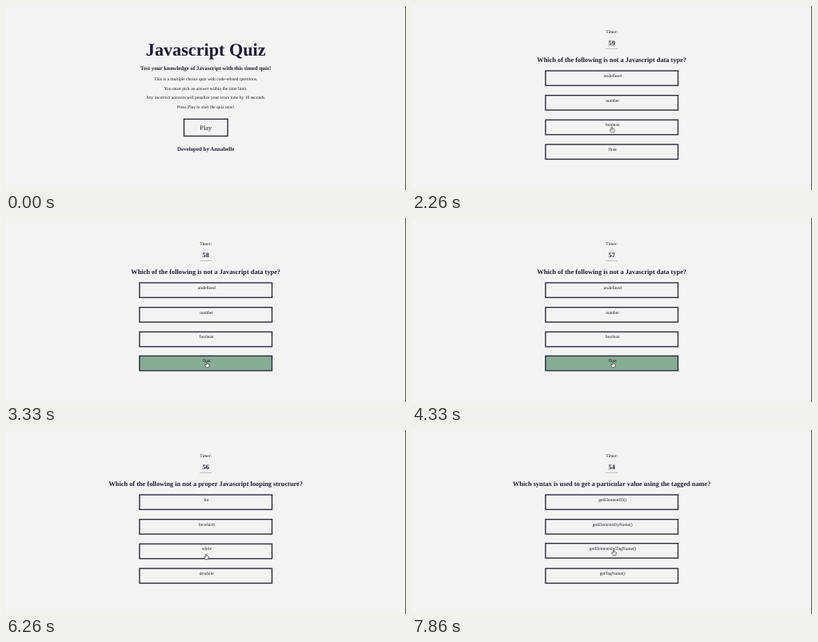
An HTML page for the animation above (8 s loop, 500 by 230 pixels).

```html
<!DOCTYPE html>
<html lang="en">
<head>
<meta charset="utf-8">
<title>Javascript Quiz</title>
<style>
  html, body { margin: 0; width: 100%; height: 100%; overflow: hidden; background: #f3f3f3; }
  svg { display: block; width: 500px; height: 230px; }
  text { font-family: "Liberation Serif", "Times New Roman", serif; font-size: 5.55px;
         text-anchor: middle; text-rendering: geometricPrecision; fill: #1b1a24; }
  .bold { font-weight: bold; fill: #1e1c31; }
  .btn rect { fill: transparent; stroke: #29263d; stroke-width: 1.35; }
  .right rect { fill: #88ab95; }
</style>
</head>
<body>
<svg viewBox="0 0 500 230">
  <g id="home"></g>
  <g id="quiz"></g>
  <g id="cursor">
    <path id="arrow" d="M0 0V5.6L1.3 4.5L2.2 6.5L3.1 6.1L2.2 4.1H3.9Z" fill="#222" stroke="#fff" stroke-width=".4"/>
    <path id="hand" d="M-.7 .5Q0 -.5 .6 .5V2.3L2.9 2.8Q3.5 3 3.4 3.9L2.7 6.7H-.6L-2.5 4.1Q-2.4 3.1 -1.5 3.5L-.7 4.1Z" fill="#fff" stroke="#333" stroke-width=".7"/>
  </g>
  <rect x="499" width="1" height="230" fill="#555"/>
</svg>
<script>
const LOOP = 8000, MID = 249.7, PITCH = 30.7, LIFT = 0.7;
const $ = id => document.getElementById(id);
const home = $("home"), quiz = $("quiz");

function add(parent, tag, attrs, content = "") {
  const el = document.createElementNS("http://www.w3.org/2000/svg", tag);
  for (const key in attrs) el.setAttribute(key, attrs[key]);
  el.textContent = content;
  return parent.appendChild(el);
}

function label(parent, y, content, size = 5.55, cls = "", x = MID) {
  return add(parent, "text", { x, y, class: cls, style: `font-size:${size}px` }, content);
}

function button(parent, x, y, width, height) {
  const g = add(parent, "g", { class: "btn" });
  add(g, "rect", { x, y, width, height });
  return g;
}

// Start page
label(home, 62, "Javascript Quiz", 22.2, "bold");
label(home, 80.4, "Test your knowledge of Javascript with this timed quiz!", 6.93, "bold");
["This is a multiple choice quiz with code-related questions.",
 "You must pick an answer within the time limit.",
 "Any incorrect answers will penalize your score time by 10 seconds.",
 "Press Play to start the quiz now!"
].forEach((line, i) => label(home, 92.8 + i * 11.83, line));
const play = button(home, 222.5, 141.4, 54.6, 21.2);
label(play, 154.9, "Play", 8.33);
label(home, 181, "Developed by Annabelle", 6.93, "bold");

// Quiz page
label(quiz, 34.4, "Timer:");
const timer = label(quiz, 48.8, "", 8.33, "bold");
add(quiz, "path", { d: "M242 53.5H257", stroke: "#aaa", "stroke-width": 0.7 });
const question = label(quiz, 70, "", 8.33, "bold");
const options = [0, 1, 2, 3].map(i => {
  const g = button(quiz, 166.9, 81 + i * PITCH, 165.6, 18.4);
  return { g, text: label(g, 89 + i * PITCH, "", 5.55, "", 250.7) };
});

const pages = [
  { at: 1260, ask: "Which of the following is not a Javascript data type?",
    list: ["undefined", "number", "boolean", "float"] },
  { at: 4400, ask: "Which of the following in not a proper Javascript looping structure?",
    list: ["for", "forwhich", "while", "dowhile"] },
  { at: 7860, ask: "Which syntax is used to get a particular value using the tagged name?",
    list: ["getElementID()", "getElementsbyName()", "getElementsbyTagName()", "getTagName()"] }
];
const ticks = [2260, 3260, 4330, 5260, 6330, 7260];

// Pointer stops: time, x, y of the tip
const path = [
  [130, 393, 57], [330, 249.5, 150], [730, 249.5, 150], [735, 250, 150.2],
  [2255, 250, 150.2], [2260, 249.8, 151.2], [2580, 251, 180],
  [6055, 251, 180], [6260, 250, 155], [6560, 252, 150]
];

const clamp = v => Math.min(1, Math.max(0, v));
const smooth = v => v * v * (3 - 2 * v);

function pointer(t) {
  const next = path.findIndex(p => p[0] > t);
  if (next < 0) return path[path.length - 1].slice(1);
  const [t0, x0, y0] = path[Math.max(0, next - 1)], [t1, x1, y1] = path[next];
  const k = smooth(clamp((t - t0) / (t1 - t0)));
  return [x0 + (x1 - x0) * k, y0 + (y1 - y0) * k];
}

function lift(el, t, start, end, span) {
  const k = t < end ? clamp((t - start) / span) : 0;
  el.setAttribute("transform", `translate(0 ${-LIFT * k * (2 - k)})`);
}

const show = (el, on) => el.style.display = on ? "" : "none";

function draw(t) {
  const page = pages.filter(p => t >= p.at).pop();
  show(home, !page);
  show(quiz, page);
  lift(play, t, 730, LOOP, 450);
  if (page) {
    timer.textContent = 60 - ticks.filter(at => t >= at).length;
    question.textContent = page.ask;
    options.forEach((o, i) => o.text.textContent = page.list[i]);
    lift(options[2].g, t, 6260, LOOP, 400);
    lift(options[3].g, t, 2460, 6130, 350);
    options[2].g.classList.toggle("right", t >= 6800 && t < 7860);
    options[3].g.classList.toggle("right", t >= 3330 && t < 4400);
  }
  const [x, y] = pointer(t);
  const overGap = page && y > 161.3 && y < 172;
  show($("cursor"), t >= 130);
  show($("arrow"), t < 730 || overGap);
  show($("hand"), t >= 730 && !overGap);
  $("cursor").setAttribute("transform", `translate(${x} ${y})`);
}

function frame() {
  draw(performance.now() % LOOP);
  requestAnimationFrame(frame);
}
frame();
</script>
</body>
</html>
```
